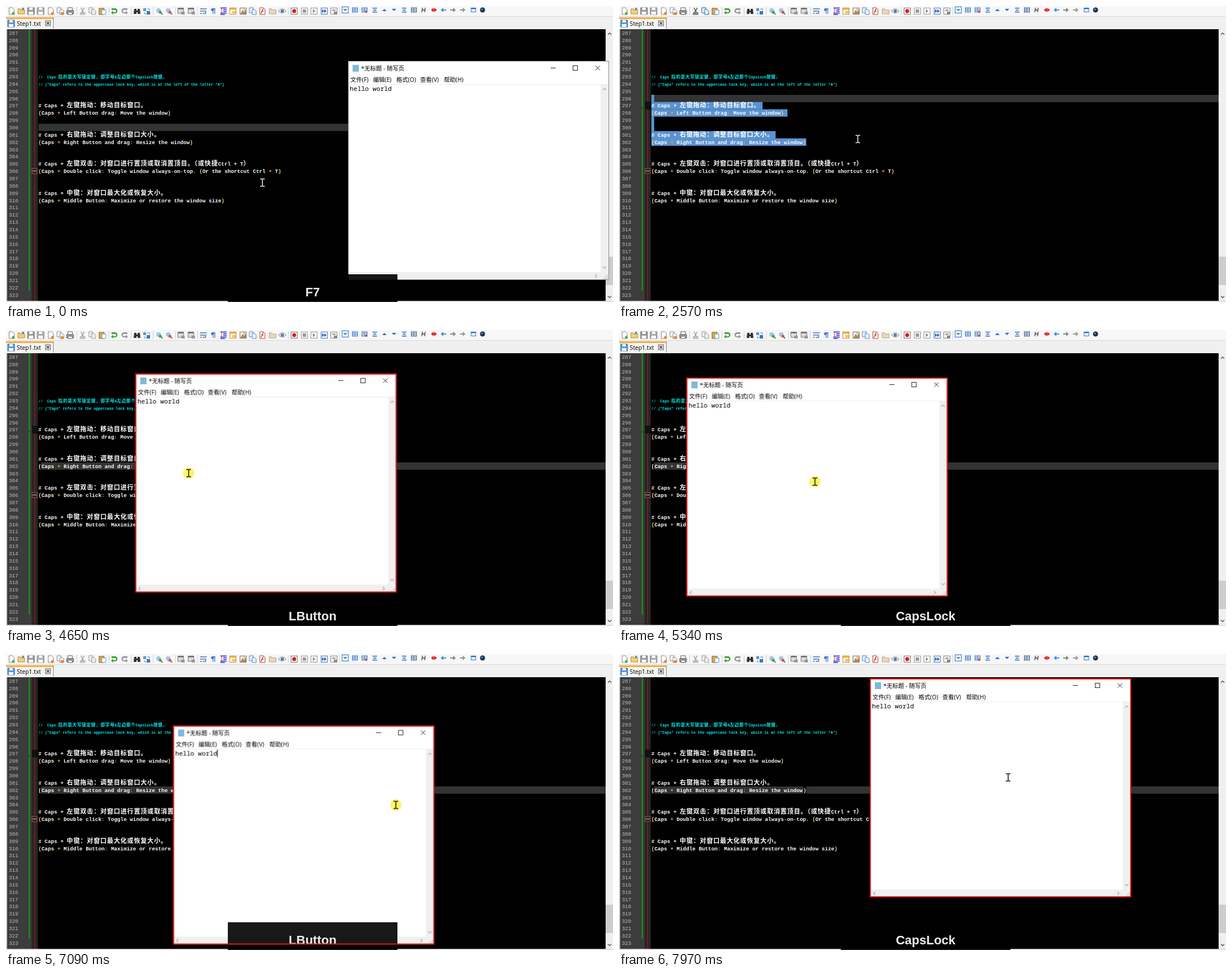
Write an HTML page that moves like this. It is 1070x523 px and loops after 8 s.

```html
<!DOCTYPE html>
<html lang="zh">
<head>
<meta charset="utf-8">
<title>Window drag demo</title>
<style>
html, body { margin: 0; width: 100%; height: 100%; overflow: hidden; background: #000; }
svg { display: block; width: 1070px; height: 523px; }
text { white-space: pre; }
.num { font: 9.2px "Liberation Mono", monospace; fill: #bdbdbd; }
.code { font: bold 9.28px "Liberation Mono", "Noto Sans CJK SC", monospace; fill: #fff; }
.note { font-size: 6.5px; fill: #00f0f0; }
.cjk { font-size: 1.19em; font-family: "Noto Sans CJK SC", sans-serif; letter-spacing: .073em; }
.paren { fill: #ffd27a; }
.op { fill: #ff9f2e; }
.ui { font: 10.3px "Open Sans", "Noto Sans CJK SC", sans-serif; fill: #000; }
.mono { font: 11.2px "Noto Sans Mono", monospace; fill: #000; }
.key { font: bold 22px "Liberation Sans", sans-serif; fill: #eee; text-anchor: middle; }
</style>
</head>
<body>
<svg id="stage" viewBox="0 0 1070 523" xmlns="http://www.w3.org/2000/svg"></svg>
<script>
const LOOP = 8000, ROW = 12.86, FIRST = 287;
const rowY = n => 41 + (n - FIRST) * ROW;

// ---- drawing helpers
const rect = (x, y, w, h, fill, extra = '') =>
  `<rect x="${x}" y="${y}" width="${w}" height="${h}" fill="${fill}" ${extra}/>`;
const path = (d, fill = 'none', stroke = 'none', w = 1) =>
  `<path d="${d}" fill="${fill}" stroke="${stroke}" stroke-width="${w}"/>`;
const line = (d, stroke, w) => path(d, 'none', stroke, w);
const dot = (x, y, r, fill) => `<circle cx="${x}" cy="${y}" r="${r}" fill="${fill}"/>`;
const text = (x, y, cls, s) => `<text x="${x}" y="${y}" class="${cls}">${s}</text>`;
const at = (x, y, body) => `<g transform="translate(${x} ${y})">${body}</g>`;
const group = (attr, body) => `<g ${attr}>${body}</g>`;
const chevron = (x, y, turn, c) =>
  `<g transform="translate(${x} ${y}) rotate(${turn})">${line('M-3 1.5l3-3 3 3', c, 1.2)}</g>`;

// ---- animation helpers
let css = '', count = 0;
function loop(sel, frames, ease) {
  const name = 'k' + count++;
  const body = frames.map(([t, v]) => `${t / LOOP * 100}%{${v}}`).join('');
  css += `@keyframes ${name}{${body}}${sel}{animation:${name} ${LOOP}ms ${ease} infinite}\n`;
}
function move(sel, pts, ease = 'linear') {
  const all = [...pts, [LOOP, ...pts[pts.length - 1].slice(1)]];
  loop(sel, all.map(([t, x, y]) => [t, `transform:translate(${x}px,${y}px)`]), ease);
}
function show(sel, ...spans) {
  const frames = [[0, 'opacity:0']];
  for (const [on, off] of spans) frames.push([on, 'opacity:1'], [off, 'opacity:0']);
  loop(sel, frames, 'step-end');
}

// ---- toolbar icons
const page = (mark, edge = '#888') =>
  path('M-4.5-6h6l3 3v9h-9z', '#fff', edge) + (mark ? dot(3, 4, 2.6, mark) : '');
const pages = (edge, fill) =>
  path('M-6-6h7v9h-7z', fill, edge) + path('M-1-3h4l3 3v6h-7z', fill, edge);
const folder = (fill, edge) => path('M-6-4h4l1 2h7v7h-12z', fill, edge);
const disk = (fill, edge) =>
  path('M-6-6h12v12h-12z', fill, edge) + path('M-3-6h6v4h-6zM-4 1h8v5h-8z', '#fff');
const frame = (c, inner) => rect(-5.5, -5.5, 11, 11, '#f8f8f8', `stroke="${c}"`) + inner;
const lens = c => line('M1 1l5 5', '#777', 2) + dot(-1, -1, 4, '#9cc8e8') + dot(2, 2, 2.6, c);
const lock = rect(-6, -5, 10, 9, '#ddd', 'stroke="#777"') + rect(-6, -6, 10, 3, '#777') + rect(0, 1, 6, 5, '#999');
const scissors = c => line('M-3-6L2 3M3-6L-2 3', c, 1.4) + line('M-4 3h3v3h-3zM1 3h3v3h-3z', c, 1.2);
const curl = c => path('M-5-5h6a4 4 0 0 1 0 9h-4v-2h4a2 2 0 0 0 0-4h-6z', c) + path('M-6 3l4-4v7z', c);
const arrow = (c, dir) => `<g transform="scale(${dir} 1)">${path('M5 0l-5-4v3h-5v2h5v3z', c)}</g>`;
const table = c => rect(-4.5, -4, 9, 8, '#fff', `stroke="${c}"`) + line('M-4-1.5h8M-4 1.5h8M0-3v6', c);
const tri = (c, s) => path(`M-4 ${2 * s}h8l-4 ${-4 * s}z`, c);
const bars = c => path('M-4-4h8v1.5h-8zM-4 3h8v1.5h-8z', c) + tri(c, .6);

const main = [
  [10, page('#58b046')], [27, folder('#f6cf70', '#b88a30') + path('M1-6h4v4h-4z', '#5c96d0')],
  [44, disk('#999', '#777')], [61, disk('#aaa', '#888')], [79, page('#f08030')],
  [96, pages('#888', '#fff') + dot(3, 4, 2.6, '#f08030')],
  [113, path('M-6-1h12v6h-12z', '#aab', '#555') + path('M-4-6h8v5h-8zM-4 2h8v4h-8z', '#fff', '#555')],
  [135, scissors('#999')], [152, pages('#999', '#eee')],
  [170, path('M-6-5h9v11h-9z', '#e0a848', '#8a6420') + path('M-1-2h7v8h-7z', '#fff', '#5c96d0')],
  [191, curl('#4f9a48')], [209, `<g transform="scale(-1 1)">${curl('#999')}</g>`],
  [231, path('M-5-4h4v3h2v-3h4l1 9h-5v-3h-2v3h-5z', '#333')],
  [248, path('M-6-5h5v5h-5z', '#5c96d0') + path('M0 0h6v6h-6z', '#3878c0') + line('M1-4h4v3M-4 2v3h3', '#58a', 1)],
  [270, lens('#48a048')], [287, lens('#e05040')], [309, lock], [327, lock],
  [348, line('M-6-4h12M-6 0h10v4h-5M-6 4h3', '#4878b0', 1.5)],
  [365, line('M0-5v10M3-5v10M-1-4h5', '#4878d0', 1.3) + dot(-1, -2.5, 2.6, '#4878d0')],
  [383, line('M-5-5.5h11M0-2.5h6M0 .5h6M-5 3.5h11M-5 6h8', '#2a2ad0', 1.5) + line('M-3-5v10', '#d04040', 1)],
  [400, frame('#c89030', path('M-5-5h10v3h-10zM-1 0h6v4h-6z', '#f4bc50'))],
  [418, frame('#777', path('M-5 5l4-7 3 3 3-4v8z', '#b88a50') + dot(2, -3, 1.6, '#e8a030'))],
  [435, pages('#5888b8', '#e8f2ff')], [452, page('', '#b04030') + line('M2-4c-3 0-2 8-5 8M-2 0h4', '#d04030', 1.3)],
  [470, folder('#e8d8c0', '#b8a080')],
  [487, path('M-7 0q7-8 14 0q-7 7-14 0z', '#e8eef4', '#888') + dot(0, 0, 2.8, '#5878a0')],
  [508, frame('#777', dot(0, 0, 3.4, '#e01818'))], [526, frame('#999', rect(-3, -3, 6, 6, '#999'))],
  [543, frame('#999', path('M-2-3.5l4 3.5-4 3.5z', '#888'))],
  [561, frame('#4878b8', path('M-4-3.5l4 3.5-4 3.5zM0-3.5l4 3.5-4 3.5z', '#2868c0'))],
  [578, frame('#888', rect(-3, -3, 6, 3, '#aaa') + rect(0, 1, 6, 5, '#888'))]
];
const blue = '#2a70c8';
const extra = [
  [598, frame(blue, tri(blue, -.7))], [615, table(blue)], [632, table(blue) + dot(3, 3, 2, '#e04040')],
  [650, bars(blue)], [667, tri(blue, 1)], [684, tri(blue, -1)], [702, bars(blue)], [719, table('#305890')],
  [736, line('M-2-4l-1 8M3-4l-1 8M-2 0h4', '#444', 1.3)], [754, arrow('#e02020', -1) + path('M5 0l-4-4v8z', '#e02020')],
  [771, arrow('#4a90e0', -1)], [788, arrow('#888', 1)], [805, arrow('#999', 1)],
  [824, rect(-4, -3.5, 8, 7, '#fff', `stroke="${blue}"`) + rect(-4, -3.5, 8, 2, blue)], [840, dot(0, 0, 4.5, '#1c3450') + dot(-1, -1, 1.5, '#6aa0c8')]
];

function toolbar() {
  const seps = [124, 181, 220, 259, 298, 337, 497, 588].map(x => rect(x, 2, 1, 14, '#d0d0d0')).join('');
  return rect(0, 0, 1070, 41, '#f0f0f0') + rect(0, 0, 1070, 18, '#f7f7f7') + rect(0, 18, 1070, 1, '#d8d8d8') + seps +
    main.map(([x, s]) => at(x, 9, s)).join('') +
    extra.map(([x, s]) => at(x, 7, s)).join('') +
    group('id="edit"', at(135, 9, scissors('#555')) + at(152, 9, pages('#3878c0', '#e8f4ff'))) +
    rect(0, 20, 83, 21, '#f4f4f4') + rect(0, 20, 83, 3, '#faaa3c') + rect(83, 20, 1, 20, '#888') +
    at(9, 31, disk('#5a9ad8', '#2f6ca8')) + text(19, 34.5, 'ui', 'Step1.txt') +
    at(74, 30.5, rect(-4.5, -4.5, 9, 9, '#eee', 'stroke="#666"') + line('M-2.5-2.5l5 5M2.5-2.5l-5 5', '#444', 1.5));
}

// ---- editor
const lines = {
  293: '//  Caps 指的是大写锁定键，即字母A左边那个CapsLock按键。',
  294: '// ("Caps" refers to the uppercase lock key, which is at the left of the letter "A")',
  297: '# Caps + 左键拖动：移动目标窗口。',
  298: '(Caps + Left Button drag: Move the window)',
  301: '# Caps + 右键拖动：调整目标窗口大小。',
  302: '(Caps + Right Button and drag: Resize the window)',
  305: '# Caps + 左键双击：对窗口进行置顶或取消置顶目。（或快捷Ctrl + T）',
  306: '(Caps + Double click: Toggle window always-on-top. (Or the shortcut Ctrl + T)',
  309: '# Caps + 中键：对窗口最大化或恢复大小。',
  310: '(Caps + Middle Button: Maximize or restore the window size)'
};
const span = (cls, s) => `<tspan class="${cls}">${s}</tspan>`;
function codeLine([n, s]) {
  let body = s.replace(/[\u3000-\uffef]+/g, m => span('cjk', m));
  if (s[0] === '(') body = s.replace(/[()]|[+:.-]/g, m => span('()'.includes(m) ? 'paren' : 'op', m));
  return text(57, rowY(n) + 9.8, s[0] === '/' ? 'code note' : 'code', body);
}
const selEnd = { 297: 253, 298: 297, 301: 276, 302: 330 };
const reach = n => 1240 + (302 - n) * 75;

function editor() {
  let nums = '', sel = '';
  for (let n = FIRST; n <= 324; n++) nums += text(5, rowY(n) + 9.8, 'num', n);
  for (let n = 296; n <= 302; n++) {
    sel += rect(57, rowY(n), (selEnd[n] || 62) - 57, ROW + .2, '#5a93d0', `id="sel${n}"`);
    show('#sel' + n, [reach(n), 2840]);
  }
  const match = [57, 325].map((x, i) =>
    rect(x, rowY(302), 5, ROW, '#000') + text(x - .2, rowY(302) + 9.8, 'code', '()'[i])).join('');
  return rect(0, 41, 1070, 482, '#000') + rect(2, 41, 43, 480, '#3c3c3c') + rect(45, 41, 11, 480, '#262626') + nums +
    rect(40, 41, 2, 462, '#0c9c0c') + rect(50, 41, 1, 480, '#c01010') +
    rect(46, 287, 9, 9, '#222', 'stroke="#b05050"') + rect(47, 291, 7, 1, '#ccc') +
    group('id="gap"', rect(46, 169, 10, 14, '#121212') + rect(40, 179, 2, 2, '#154015')) +
    rect(57, 0, 1000, ROW, '#333', 'id="current"') + sel +
    Object.entries(lines).map(codeLine).join('') + group('id="match"', match) +
    rect(330, 233, 1, 14, '#fff', 'id="caret"') +
    rect(1057, 41, 13, 480, '#f0f0f0') + rect(1057, 443, 13, 50, '#cdcdcd') +
    chevron(1064, 49, 0, '#444') + chevron(1064, 514, 180, '#444') +
    rect(0, 521, 1070, 2, '#dedede') + rect(0, 41, 2, 480, '#d0d0d0');
}

// ---- small window, origin at its top left
function pad() {
  const menu = [[4, '文件(F)'], [44, '编辑(E)'], [85, '格式(O)'], [127, '查看(V)'], [169, '帮助(H)']];
  let grip = '';
  for (let i = 0; i < 3; i++) for (let j = 0; j <= i; j++) grip += rect(456 - j * 3, 378 + i * 3, 1.5, 1.5, '#aaa');
  return rect(.5, .5, 459, 386, '#fff', 'stroke="#8a8a8a"') +
    rect(8, 7, 11, 12, '#7fb9d8') + text(23, 17, 'ui', '*无标题 - 随写页') +
    line('M357 12.5h9', '#222') + rect(396.5, 8.5, 8, 8, 'none', 'stroke="#222"') +
    line('M436 8.5l8 8M444 8.5l-8 8', '#222') +
    menu.map(([x, s]) => text(x, 37, 'ui', s)).join('') +
    rect(1, 41, 458, 1, '#ececec') + rect(445, 42, 14, 331, '#f0f0f0') + rect(1, 373, 458, 13, '#f0f0f0') +
    chevron(452, 50, 0, '#aaa') + chevron(452, 365, 180, '#aaa') +
    chevron(7, 380, 270, '#aaa') + chevron(437, 380, 90, '#aaa') + grip +
    text(3, 53, 'mono', 'hello world') + rect(77, 42, 1, 14, '#000', 'id="padCaret"');
}

const keys = ['F7', 'CapsLock', 'LButton'].map((s, i) =>
  `<text x="540.5" y="513" class="key" id="key${i}">${s}</text>`).join('');
const beam = 'M-4-6.5h2.5l1.5 1 1.5-1h2.5M0-5.5v11M-4 6.5h2.5l1.5-1 1.5 1h2.5';

document.getElementById('stage').innerHTML =
  editor() + toolbar() +
  group('class="win"', group('id="pad"', pad())) +
  rect(391, 474, 299, 49, 'rgba(0,0,0,.9)', 'id="plate"') + keys +
  group('class="win"', rect(0, 1, 459, 385, 'none', 'stroke="#e81818" stroke-width="2" id="edge"')) +
  group('id="mouse"', `<circle r="10" fill="rgba(255,236,0,.6)" id="press"/>` +
    `<path d="${beam}" fill="none" stroke-width="1.4" id="beam"/>`);

// ---- timeline
const current = [[0, 0, rowY(300)]];
for (let n = 302; n >= 296; n--) current.push([reach(n), 0, rowY(n)]);
current.push([2840, 0, rowY(302)]);
move('#current', current, 'step-end');

move('.win', [
  [0, 603, 97], [4380, 603, 97], [4450, 569, 90], [4650, 230, 77], [4750, 94, 60], [5000, 430, 20],
  [5150, 300, 50], [5280, 94, 84], [5340, 118, 84], [5590, 489, 82], [5920, 115, 81], [6940, 115, 81],
  [7090, 293, 127], [7200, 543, 66], [7350, 480, 0], [7550, 400, 30], [7700, 440, 44], [7900, 443, 43]
]);
move('#mouse', [
  [0, 452, 312], [330, 452, 312], [700, 147, 270], [1080, 341, 243], [1230, 341, 243], [1720, 45, 170],
  [1890, 45, 170], [2500, 421, 235], [3700, 421, 235], [4380, 763, 276], [4450, 700, 270], [4650, 323, 253],
  [4720, 253, 240], [4980, 590, 200], [5270, 253, 263], [5340, 344, 268], [5560, 649, 263], [5900, 275, 260],
  [6070, 275, 260], [6870, 358, 256], [6940, 358, 256], [7090, 686, 267], [7170, 786, 240], [7330, 723, 176],
  [7530, 645, 203], [7680, 684, 219], [7900, 686, 218]
]);
loop('#beam', [[0, 'stroke:#fff'], [4060, 'stroke:#000']], 'step-end');
show('#press', [1140, 1750], [2840, 2990], [4380, 5950], [6900, 7640]);
show('#pad', [0, 1140], [3700, LOOP]);
show('#padCaret', [130, 660], [3720, 4250], [4780, 5310], [5840, 6370], [6900, 7430]);
show('#edge', [4000, 6070], [6800, LOOP]);
show('#plate', [0, 900], [3200, LOOP]);
show('#key0', [0, 900], [3200, 3900]);
show('#key1', [3900, 4380], [5000, 6940], [7640, LOOP]);
show('#key2', [4380, 5000], [6940, 7640]);
show('#edit', [1240, 2840]);
show('#match', [2840, LOOP]);
show('#caret', [2910, 3440]);
show('#gap', [1890, LOOP]);

const style = document.createElement('style');
style.textContent = css;
document.head.append(style);
</script>
</body>
</html>
```
